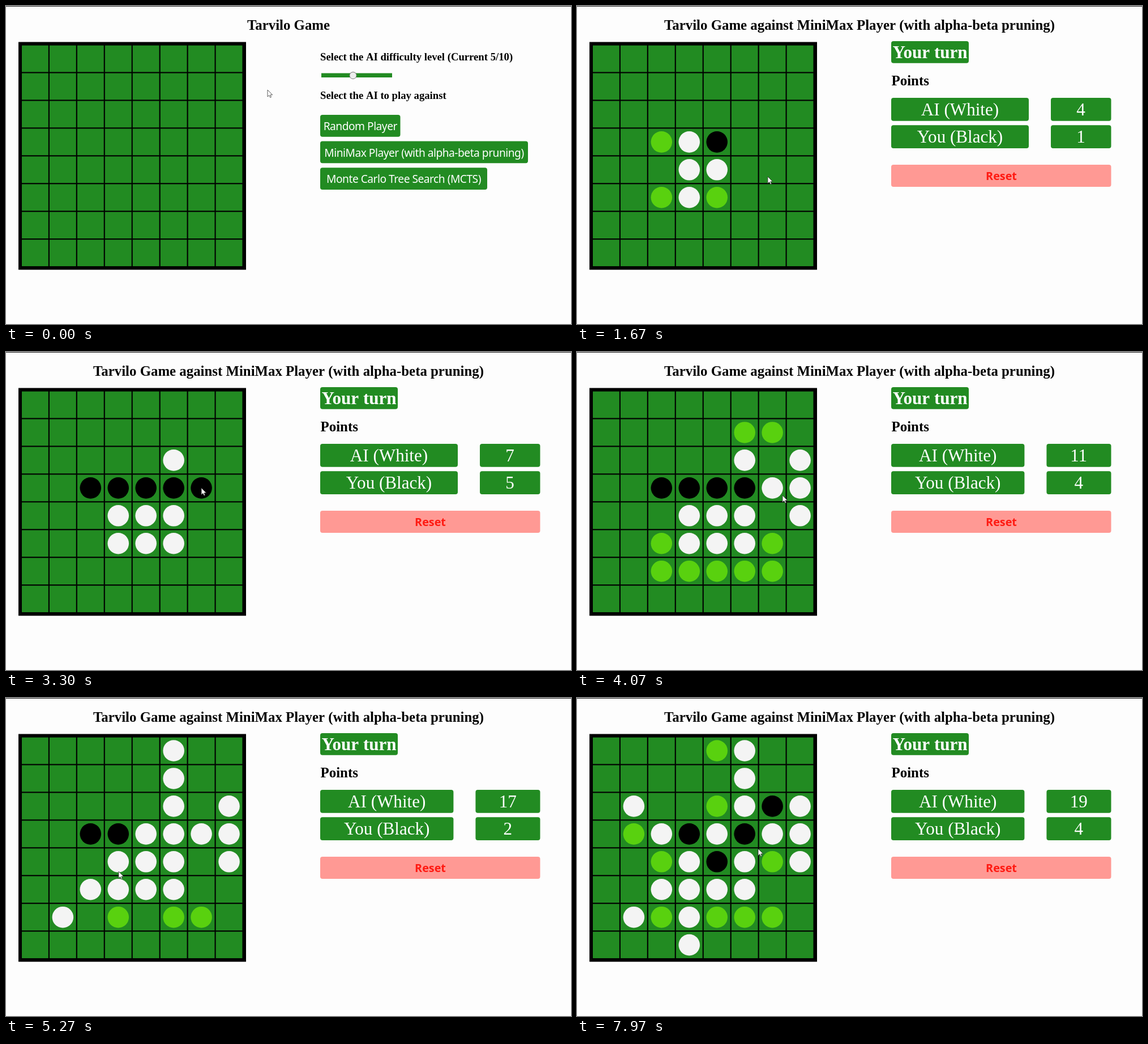
An HTML page with a canvas for the animation above (8 s loop, 998x561 px).

```html
<!DOCTYPE html>
<html lang="en">
<head>
<meta charset="utf-8">
<title>Tarvilo Game</title>
<style>
html, body { margin: 0; width: 100%; height: 100%; overflow: hidden; background: #fdfdfd; }
canvas { display: block; }
</style>
</head>
<body>
<canvas id="stage" width="998" height="561"></canvas>
<script>
const ctx = document.getElementById('stage').getContext('2d');
const LOOP = 8000, MENU_CLICK = 860, COIN_CLICK = 1240, REPLY_DELAY = 130;
const GREEN = '#228b22', HINT = '#59d10f', WHITE = '#f4f4f4';
const SERIF = '"Liberation Serif", serif', SANS = '"Noto Sans", sans-serif';
const DISC = { W: WHITE, B: '#000', hint: HINT };

// Each round: time of the player's move, player's cell, AI's cell (row, column)
const ROUNDS = [
  [1860, '54', '55'], [2250, '32', '25'], [2780, '35', '45'],
  [3260, '36', '27'], [3720, '37', '47'], [4540, '15', '05'],
  [4980, '52', '61'], [5860, '63', '21'], [7010, '26', '73']
];
const centre = (row, col) => [51.4 + 48.95 * col, 93 + 48.95 * row];

// ---------- game rules ----------
const DIRECTIONS = [[-1, -1], [-1, 0], [-1, 1], [0, -1], [0, 1], [1, -1], [1, 0], [1, 1]];

function flips(board, row, col, colour) {
  if (board[row + '' + col]) return [];
  return DIRECTIONS.flatMap(([dr, dc]) => {
    const line = [];
    for (let r = row + dr, c = col + dc; ; r += dr, c += dc) {
      const disc = board[r + '' + c];
      if (!disc) return [];
      if (disc === colour) return line;
      line.push(r + '' + c);
    }
  });
}

function play(board, cell, colour) {
  const next = { ...board };
  for (const c of [cell, ...flips(board, +cell[0], +cell[1], colour)]) next[c] = colour;
  return next;
}

function playerHints(board) {
  const cells = [];
  for (let r = 0; r < 8; r++)
    for (let c = 0; c < 8; c++)
      if (flips(board, r, c, 'B').length) cells.push(r + '' + c);
  return cells;
}

function buildStates() {
  let board = { 33: 'W', 44: 'W', 34: 'B', 43: 'B' };
  const states = [{ time: COIN_CLICK, board, hints: [] }];
  const add = (time, cell, colour) => {
    board = play(board, cell, colour);
    states.push({ time, board, hints: colour === 'W' ? playerHints(board) : [] });
  };
  add(COIN_CLICK + REPLY_DELAY, '53', 'W');
  for (const [time, mine, reply] of ROUNDS) {
    add(time, mine, 'B');
    add(time + REPLY_DELAY, reply, 'W');
  }
  return states;
}
const states = buildStates();

// ---------- pointer ----------
const path = [
  [0, 462, 148], [60, 462, 148], [800, 648, 248], [900, 648, 248],
  [1200, 705, 150], [1270, 705, 150], [2420, 150, 239],
  [4070, 363, 253], [4230, 363, 253], [5240, 199, 306], [5300, 199, 306],
  [6500, 100, 226], [6620, 100, 226], [7390, 293, 252], [7830, 293, 252],
  [7900, 322, 276], [7970, 320, 266], [8000, 320, 266]
];
for (const [time, cell] of ROUNDS) {
  const spot = centre(+cell[0], +cell[1]);
  path.push([time - 30, ...spot], [time + 70, ...spot]);
}
path.sort((a, b) => a[0] - b[0]);

function pointerAt(t) {
  const i = path.findIndex(p => p[0] > t);
  const [t0, x0, y0] = path[i - 1], [t1, x1, y1] = path[i];
  const u = (t - t0) / (t1 - t0), e = u * u * (3 - 2 * u);
  return [x0 + (x1 - x0) * e, y0 + (y1 - y0) * e];
}

// ---------- drawing ----------
function text(str, x, y, font, colour = '#000', align = 'left', spacing = 0) {
  ctx.font = font;
  ctx.fillStyle = colour;
  ctx.textAlign = align;
  ctx.letterSpacing = spacing + 'px';
  ctx.fillText(str, x, y);
}
const heading = (str, x, y, size, align, colour) =>
  text(str, x, y, `bold ${size}px ${SERIF}`, colour, align);

function roundBox(x, y, w, h, colour) {
  ctx.beginPath();
  ctx.roundRect(x, y, w, h, 4);
  ctx.fillStyle = colour;
  ctx.fill();
}

function button(label, x, y, w) {
  roundBox(x, y, w, 38.7, GREEN);
  text(label, x + w / 2, y + 27, `19.2px ${SANS}`, '#fff', 'center', -0.5);
}

function resetButton(y) {
  roundBox(555, y, 388.5, 39, '#ff9994');
  text('Reset', 749.5, y + 27, `bold 19.8px ${SANS}`, '#ff1a12', 'center');
}

function circle(x, y, r, colour) {
  ctx.beginPath();
  ctx.arc(x, y, r, 0, 2 * Math.PI);
  ctx.fillStyle = colour;
  ctx.fill();
}

function drawBoard({ board, hints }) {
  ctx.fillStyle = '#000';
  ctx.fillRect(22, 63.5, 402, 401.8);
  ctx.fillStyle = GREEN;
  for (let r = 0; r < 8; r++)
    for (let c = 0; c < 8; c++) {
      const [x, y] = centre(r, c);
      ctx.fillRect(x - 23.4, y - 23.4, 46.8, 46.8);
    }
  const disc = (cell, kind) => circle(...centre(+cell[0], +cell[1]), 18.8, DISC[kind]);
  Object.keys(board).forEach(cell => disc(cell, board[cell]));
  hints.forEach(cell => disc(cell, 'hint'));
}

function drawMenu() {
  heading('Select the AI difficulty level (Current 5/10)', 555, 96, 18.7);
  ctx.fillStyle = GREEN;
  ctx.fillRect(557, 118.5, 125, 7.5);
  circle(613, 122.5, 6.5, '#777');
  circle(613, 122.5, 5.6, '#eee');
  heading('Select the AI to play against', 555, 164, 18.7);
  button('Random Player', 555, 192, 141.5);
  button('MiniMax Player (with alpha-beta pruning)', 555, 238.5, 367);
  button('Monte Carlo Tree Search (MCTS)', 555, 285.3, 295);
}

function drawCoinChoice() {
  ctx.beginPath();
  ctx.roundRect(555.8, 64.5, 387, 118, 4);
  ctx.lineWidth = 1.6;
  ctx.strokeStyle = '#000';
  ctx.stroke();
  heading('Choose your coin', 572, 108.5, 14.6);
  ['White', 'Black', 'Random'].forEach((label, i) => button(label, 572 + 89 * i, 127, 86));
  resetButton(205);
}

function drawScores({ board }) {
  const discs = Object.values(board);
  const count = colour => discs.filter(d => d === colour).length;
  const rows = [['AI (White)', count('W')], ['You (Black)', count('B')]];
  const shift = rows.some(row => row[1] > 9) ? 7.6 : 0;
  const font = `31.1px ${SERIF}`;

  roundBox(555, 62, 137, 38.7, GREEN);
  heading('Your turn', 557.5, 92, 31.1, 'left', '#fff');
  heading('Points', 555.5, 139.5, 24.9);
  rows.forEach(([label, points], i) => {
    const y = 162 + 48.3 * i;
    roundBox(555, y, 243 - shift, 40.7, GREEN);
    roundBox(837 - shift, y, 106.5 + shift, 40.7, GREEN);
    text(label, 676.5 - shift / 2, y + 31, font, '#fff', 'center');
    text(points, 890 - shift / 2, y + 31, font, '#fff', 'center');
  });
  resetButton(280);
}

function drawPointer(x, y) {
  ctx.save();
  ctx.translate(x, y);
  const arrow = new Path2D('M0 0V12L2.8 9.5L4.7 13.5L6.5 12.7L4.8 8.9L8.6 8.7Z');
  ctx.fillStyle = '#fff';
  ctx.fill(arrow);
  ctx.lineWidth = 0.8;
  ctx.strokeStyle = '#333';
  ctx.stroke(arrow);
  ctx.restore();
}

function draw(t) {
  ctx.fillStyle = '#fdfdfd';
  ctx.fillRect(0, 0, 998, 561);
  ctx.fillStyle = '#222';
  ctx.fillRect(0, 0, 998, 1);

  const opponent = t < MENU_CLICK ? '' : ' against MiniMax Player (with alpha-beta pruning)';
  heading('Tarvilo Game' + opponent, 499, 41.5, 24.85, 'center');

  const state = states.filter(s => s.time <= t).pop();
  drawBoard(state || { board: {}, hints: [] });
  if (state) drawScores(state);
  else if (t < MENU_CLICK) drawMenu();
  else drawCoinChoice();
  drawPointer(...pointerAt(t));
}

const start = performance.now();
function tick() {
  draw((performance.now() - start) % LOOP);
  requestAnimationFrame(tick);
}
tick();
</script>
</body>
</html>
```
